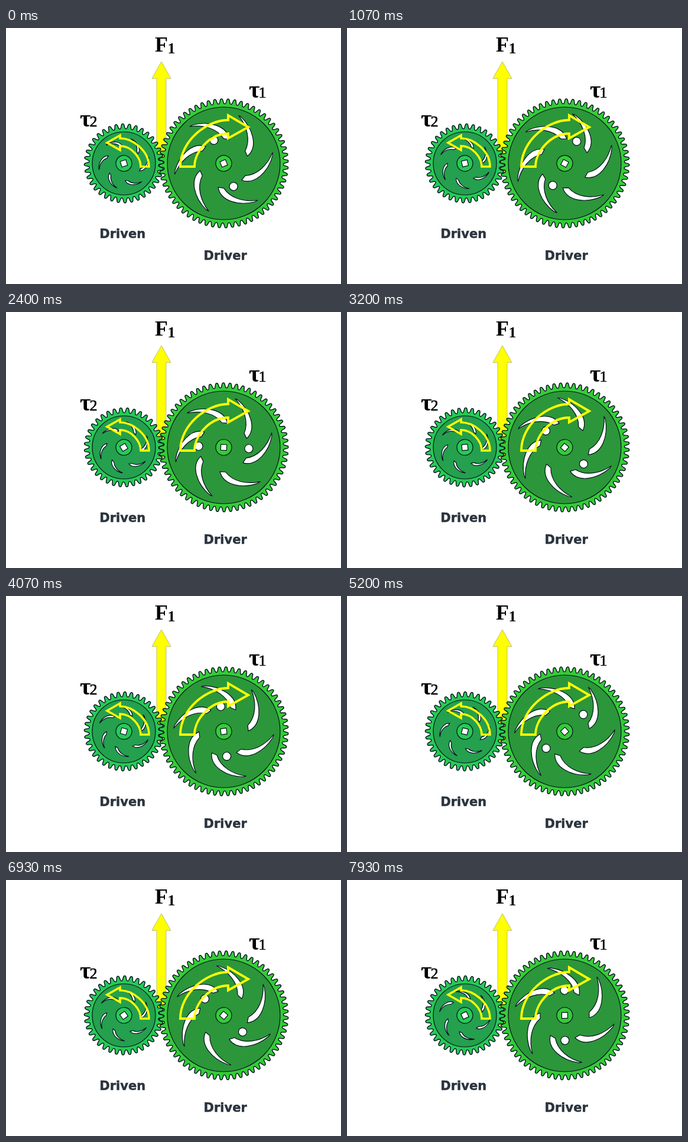
Write an HTML page with a canvas that moves like this. It is 567x434 px and loops after 8000 ms.

```html
<!DOCTYPE html>
<html lang="en">
<head>
<meta charset="utf-8">
<title>Gear pair</title>
<style>
  html, body { margin: 0; width: 100%; height: 100%; overflow: hidden; background: #fff; }
  canvas { display: block; width: 567px; height: 434px; }
</style>
</head>
<body>
<canvas id="stage"></canvas>
<script>
const W = 567, H = 434;
const LOOP = 8000, STEPS = 120;
const RAD = Math.PI / 180;
const STEP_DEG = 360 / 112;
const RATIO = 5 / 3;
const INK = '#04101c', YELLOW = '#ffff00';

const canvas = document.getElementById('stage');
const ctx = canvas.getContext('2d');
const dpr = window.devicePixelRatio || 1;
canvas.width = W * dpr;
canvas.height = H * dpr;

// A slot is an outer curve, a short bevel at its tip and an inner curve back.
const driver = {
  x: 368.5, y: 229.5, teeth: 60, pitch: 105.2, disc: 95.5,
  rim: '#35cb38', face: '#2c963a',
  outer: [-41.5, -4, -65, 3, -68, 36, -57.5, 61],
  inner: [-54.5, 65, -60.5, 43, -57.5, 19, -41.5, 5.5],
  holes: 42.5
};
const driven = {
  x: 199.5, y: 229.5, teeth: 36, pitch: 62.9, disc: 53.5,
  rim: '#26ca55', face: '#24a04e',
  outer: [-28.5, 6, -35.5, 11, -36, 23, -28, 33],
  inner: [-26.5, 34, -32.5, 25, -31.5, 16, -28, 11],
  holes: 0
};

function paint(path, fill, width = 1.2) {
  ctx.fillStyle = fill;
  ctx.fill(path);
  ctx.strokeStyle = INK;
  ctx.lineWidth = width;
  ctx.stroke(path);
}

function circle(x, y, r) {
  const p = new Path2D();
  p.arc(x, y, r, 0, 2 * Math.PI);
  return p;
}

function toothedRim({ teeth, pitch }) {
  const p = new Path2D();
  const n = teeth * 18;
  for (let i = 0; i < n; i++) {
    const a = i / n * 2 * Math.PI;
    const r = pitch + 4.2 * Math.tanh(1.5 * Math.cos(a * teeth)) / Math.tanh(1.5);
    p.lineTo(r * Math.cos(a), r * Math.sin(a));
  }
  p.closePath();
  return p;
}

function slotPath({ outer, inner }) {
  const p = new Path2D();
  for (const [x, y, ...curve] of [outer, inner]) {
    p.lineTo(x, y);
    p.bezierCurveTo(...curve);
  }
  p.closePath();
  return p;
}

for (const gear of [driver, driven]) {
  gear.rimPath = toothedRim(gear);
  gear.slotPath = slotPath(gear);
}
const bore = new Path2D();
bore.rect(-5, -5, 10, 10);

function turned(deg, draw) {
  ctx.save();
  ctx.rotate(deg * RAD);
  draw();
  ctx.restore();
}

function drawGear(gear, { tooth, slot, square }) {
  ctx.save();
  ctx.translate(gear.x, gear.y);
  turned(tooth, () => paint(gear.rimPath, gear.rim, 1.4));
  paint(circle(0, 0, gear.disc), gear.face);
  for (let i = 0; i < 6; i++) {
    turned(slot + i * 60, () => paint(gear.slotPath, '#fff'));
  }
  turned(square, () => {
    if (gear.holes) {
      for (const side of [-1, 1]) paint(circle(side * gear.holes, 0, 7), '#fff');
    }
    paint(circle(0, 0, 13.5), gear.rim);
    paint(bore, '#fff');
  });
  ctx.restore();
}

function drawForce() {
  ctx.beginPath();
  ctx.moveTo(263, 57);
  for (const [x, y] of [[279, 85.5], [271, 85.5], [271, 247], [255, 247], [255, 85.5], [247, 85.5]]) {
    ctx.lineTo(x, y);
  }
  ctx.closePath();
  ctx.fillStyle = YELLOW;
  ctx.fill();
  ctx.strokeStyle = '#b0b066';
  ctx.lineWidth = 0.8;
  ctx.stroke();
}

// Outlined quarter-turn arrow: foot spans x0..x1, head runs from neck to tip.
function drawTurnArrow(a) {
  const foot = 235, k = 0.5523;
  const bend = (x, y, fx, fy, vertical) => {
    if (vertical) ctx.bezierCurveTo(fx, fy + (y - fy) * k, x + (fx - x) * (1 - k), y, x, y);
    else ctx.bezierCurveTo(fx + (x - fx) * k, fy, x, y + (fy - y) * (1 - k), x, y);
  };
  ctx.beginPath();
  ctx.moveTo(a.x0, foot);
  bend(a.neck, a.outer, a.x0, foot, true);
  ctx.lineTo(a.neck, a.top);
  ctx.lineTo(a.tip, a.tipY);
  ctx.lineTo(a.neck, a.bottom);
  ctx.lineTo(a.neck, a.inner);
  bend(a.x1, foot, a.neck, a.inner, false);
  ctx.closePath();
  ctx.strokeStyle = YELLOW;
  ctx.lineWidth = a.line;
  ctx.lineJoin = 'miter';
  ctx.stroke();
}

const bigTurn = { x0: 295, x1: 319, neck: 376, outer: 156, inner: 179, top: 148, bottom: 187, tip: 410, tipY: 168, line: 3.8 };
const smallTurn = { x0: 242, x1: 228, neck: 193, outer: 187, inner: 200, top: 182, bottom: 207, tip: 171, tipY: 194.5, line: 3.5 };

const SERIF = '"Liberation Serif", serif';
const SANS = '"DejaVu Sans", sans-serif';

function label(text, x, y, font, color = '#000', weight = 0) {
  ctx.font = font;
  ctx.fillStyle = ctx.strokeStyle = color;
  ctx.fillText(text, x, y);
  if (weight) {
    ctx.lineWidth = weight;
    ctx.strokeText(text, x, y);
  }
}

function torque(index, x, y) {
  label('τ', x, y, `bold 40px ${SERIF}`);
  label(index, x + 16.5, y, `26px ${SERIF}`, '#000', 0.7);
}

function drawLabels() {
  label('F', 252, 40, `bold 36px ${SERIF}`);
  label('1', 273.5, 42.5, `bold 26px ${SERIF}`);
  torque('1', 411, 118);
  torque('2', 125, 166.5);
  label('Driven', 158.3, 356, `bold 21px ${SANS}`, '#2b343e', 0.5);
  label('Driver', 334.5, 393, `bold 21px ${SANS}`, '#2b343e', 0.5);
}

function draw(now) {
  const step = Math.min(STEPS - 1, Math.floor((now % LOOP + 5) * STEPS / LOOP));
  const spin = step * STEP_DEG;
  const angle = 67 + spin;
  const back = -spin * RATIO;

  ctx.setTransform(dpr, 0, 0, dpr, 0, 0);
  ctx.lineJoin = 'round';
  ctx.fillStyle = '#fff';
  ctx.fillRect(0, 0, W, H);
  drawForce();
  drawGear(driven, { tooth: -angle * RATIO, slot: back - 22, square: back + 72 });
  drawGear(driver, { tooth: angle + 3, slot: angle - 89.5, square: angle });
  drawTurnArrow(bigTurn);
  drawTurnArrow(smallTurn);
  ctx.lineJoin = 'round';
  drawLabels();
}

let start;
function tick() {
  const now = performance.now();
  start ??= now;
  draw(now - start);
  requestAnimationFrame(tick);
}
tick();
</script>
</body>
</html>
```
